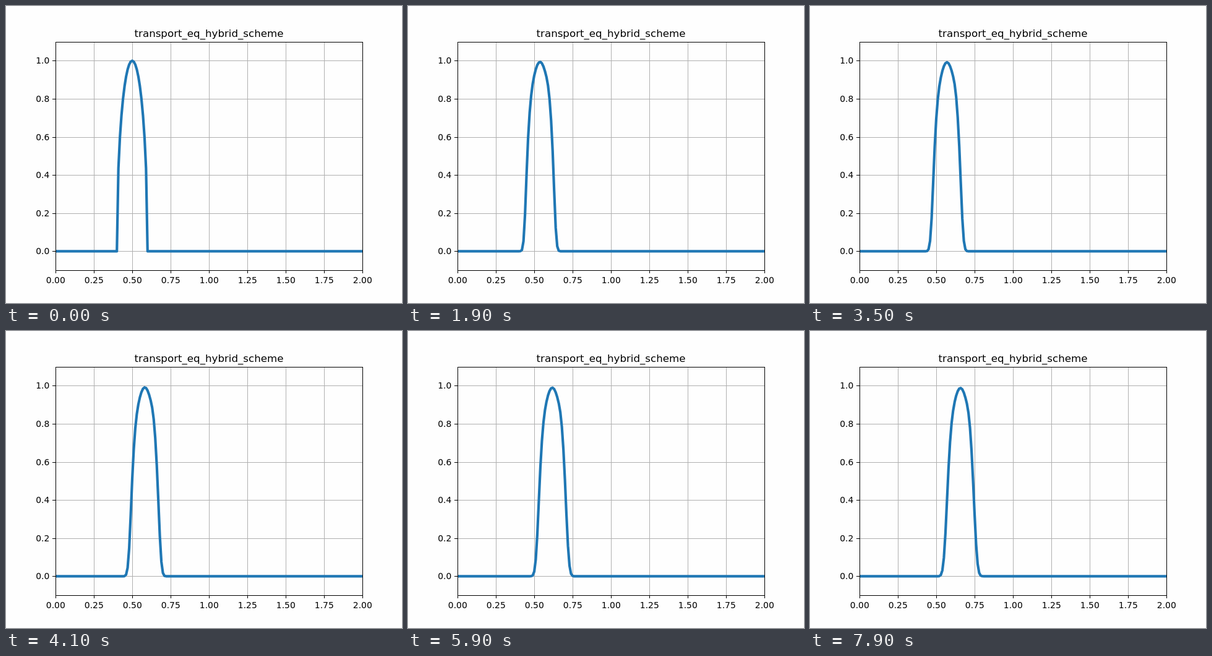
These frames come from a looping animation (640 by 480 pixels, 8 s). An HTML page with a canvas:

```html
<!DOCTYPE html>
<html lang="en">
<head>
<meta charset="utf-8">
<title>transport_eq_hybrid_scheme</title>
<style>
  html, body { margin: 0; width: 100%; height: 100%; overflow: hidden; background: #fefefe; }
  canvas { display: block; width: 640px; height: 480px; }
</style>
</head>
<body>
<canvas id="plot" width="640" height="480"></canvas>
<script>
const ctx = document.getElementById('plot').getContext('2d');
const LEFT = 80, RIGHT = 576, TOP = 58, BOTTOM = 427;
const STEP_MS = 100, STEPS = 80;
const DX = 0.01, CELLS = 200, COURANT = 0.2;

const px = x => LEFT + x * 248;
const py = u => 396.4 - u * 308;

// Half-ellipse pulse on the grid, joined by straight segments
const sample = i => Math.sqrt(Math.max(0, 1 - ((i - 50) / 10) ** 2));
function pulse(pos) {
  const i = Math.floor(pos), f = pos - i;
  return sample(i) * (1 - f) + sample(i + 1) * f;
}

const bump = (d, width) => Math.exp(-0.5 * (d / width) ** 2);

// Advected pulse with slowly growing numerical diffusion
function solution(cell, n) {
  const pos = cell - COURANT * n;
  if (n === 0) return pulse(pos);
  if (pos < 32 || pos > 68) return 0;
  const sigma = 0.5 * Math.pow(n, 0.25);
  let sum = 0, total = 0;
  for (let k = -40; k <= 40; k++) {
    const z = k / 10, w = bump(z, 1);
    sum += w * pulse(pos - z * sigma);
    total += w;
  }
  // The scheme keeps the shoulders fuller, more so at the front
  const grow = Math.min(1, n / 15);
  const shoulders = 0.028 * bump(pos - 55.8, 1.4) + 0.014 * bump(pos - 44.2, 1.4);
  return sum / total + grow * shoulders;
}

function drawGrid() {
  ctx.fillStyle = '#b0b0b0';
  for (let i = 0; i <= 8; i++) ctx.fillRect(px(i / 4), TOP, 1, BOTTOM - TOP);
  for (let i = 0; i <= 5; i++) ctx.fillRect(LEFT, Math.round(py(i / 5)), RIGHT - LEFT, 1);
}

function drawCurve(n) {
  ctx.save();
  ctx.beginPath();
  ctx.rect(LEFT, TOP, RIGHT - LEFT, BOTTOM - TOP);
  ctx.clip();
  ctx.beginPath();
  for (let i = 0; i <= CELLS; i++) ctx.lineTo(px(i * DX), py(solution(i, n)));
  ctx.strokeStyle = '#1f77b4';
  ctx.lineWidth = 4.17;
  ctx.lineJoin = 'round';
  ctx.lineCap = 'square';
  ctx.stroke();
  ctx.restore();
}

function drawAxes() {
  ctx.fillStyle = '#000';
  ctx.fillRect(LEFT, TOP, RIGHT - LEFT + 1, 1);
  ctx.fillRect(LEFT, BOTTOM, RIGHT - LEFT + 1, 1);
  ctx.fillRect(LEFT, TOP, 1, BOTTOM - TOP + 1);
  ctx.fillRect(RIGHT, TOP, 1, BOTTOM - TOP + 1);

  ctx.font = '13.89px "DejaVu Sans", sans-serif';
  ctx.textBaseline = 'alphabetic';
  ctx.textAlign = 'center';
  for (let i = 0; i <= 8; i++) {
    const x = px(i / 4);
    ctx.fillRect(x, BOTTOM, 1, 5);
    ctx.fillText((i / 4).toFixed(2), x + 0.3, 448);
  }
  ctx.textAlign = 'right';
  for (let i = 0; i <= 5; i++) {
    const y = py(i / 5);
    ctx.fillRect(LEFT - 5, Math.round(y), 5, 1);
    ctx.fillText((i / 5).toFixed(1), 70.3, Math.round(y + 5));
  }
  ctx.textAlign = 'center';
  ctx.font = '16.67px "DejaVu Sans", sans-serif';
  ctx.fillText('transport_eq_hybrid_scheme', 328, 50);
}

function draw(n) {
  ctx.fillStyle = '#fefefe';
  ctx.fillRect(0, 0, 640, 480);
  drawGrid();
  drawCurve(n);
  drawAxes();
}

const start = performance.now();
let shown = -1;
function tick() {
  const n = Math.floor((performance.now() - start) / STEP_MS) % STEPS;
  if (n !== shown) draw(shown = n);
  requestAnimationFrame(tick);
}
tick();
</script>
</body>
</html>
```
